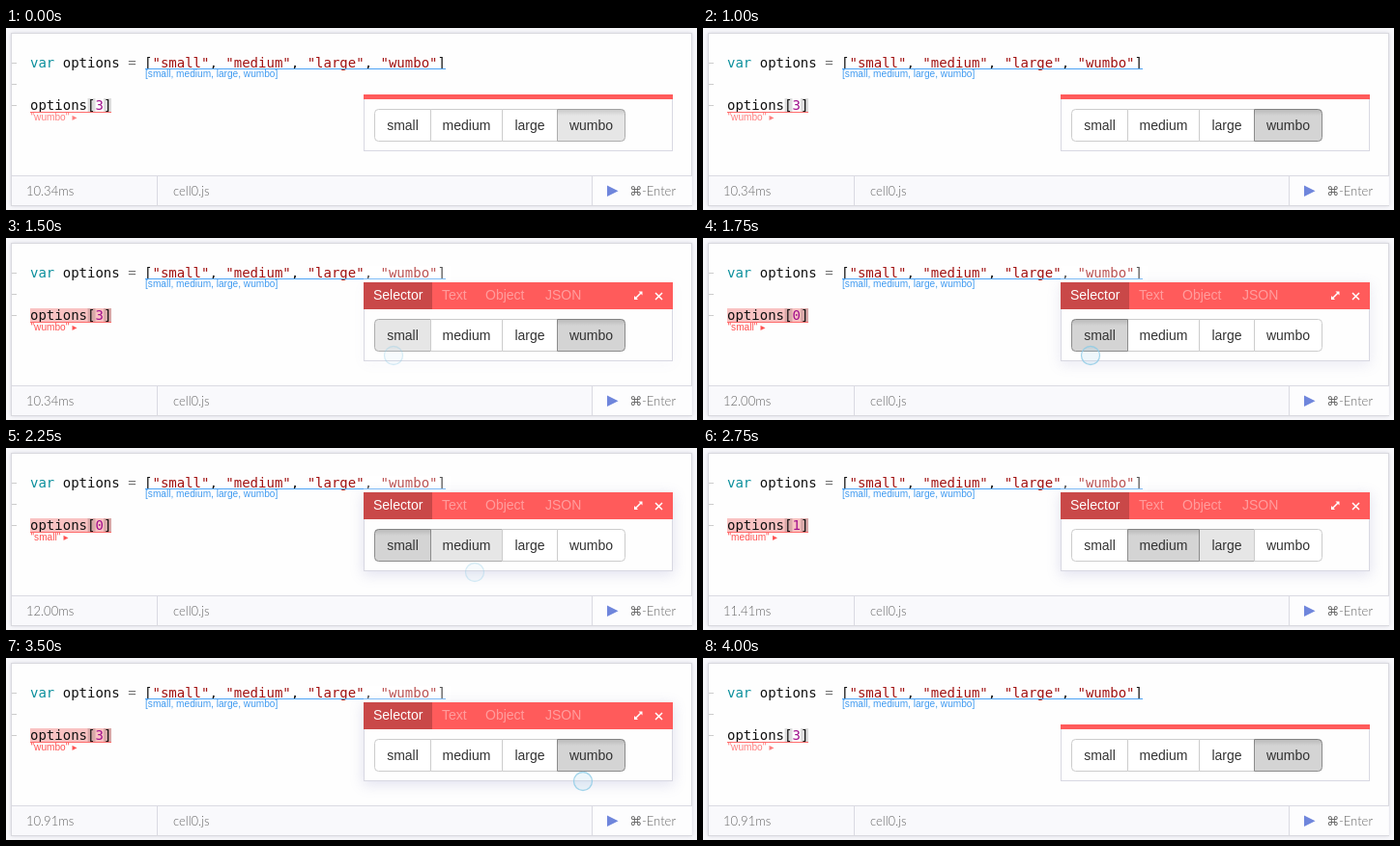
Animation, 715 px wide and 189 px high, one loop 5 s. Source, as an HTML page:

```html
<!DOCTYPE html>
<html lang="en">
<head>
<meta charset="utf-8">
<title>Selector widget</title>
<style>
  html, body { margin: 0; width: 100%; height: 100%; overflow: hidden; background: #f8f8fb; }
  svg { display: block; width: 715px; height: 189px; }
  text { white-space: pre; }
  .code { font: 14px "DejaVu Sans Mono", monospace; fill: #111; }
  .key { fill: #0a8f9c; }
  .op { fill: #777; }
  .str { fill: #a11111; }
  .num { fill: #a0108c; }
  .note { font: 10.15px "Liberation Sans", Arial, sans-serif; }
  .arrow { font: 10px "DejaVu Sans", sans-serif; }
  .foot { font: 300 13px Lato, sans-serif; fill: #666; }
  .foot .cmd { font: 13px "DejaVu Sans", sans-serif; }
  .ui { font: 14px "Liberation Sans", Arial, sans-serif; }
  .card { fill: #fefefe; stroke: #d9d9df; filter: drop-shadow(0 0 2px rgba(90, 90, 120, .2)); }
  .line { fill: none; stroke: #dadae2; }
  .shade { fill: #7878b8; filter: blur(7px); }
  .btn path { fill: #fff; stroke: #ccc; }
  .btn text { fill: #333; text-anchor: middle; }
  .btn .inset { fill: none; stroke: none; }
  .btn.hover path { fill: #e6e6e6; stroke: #adadad; }
  .btn.on path { fill: #d4d4d4; stroke: #8c8c8c; }
  .btn.soft path { fill: #e6e6e6; stroke: #adadad; }
  .btn.on .inset, .btn.soft .inset { fill: url(#inset); stroke: none; }
  .btn.hover .inset { fill: none; stroke: none; }
  .tabs { fill: #fff; }
  .dim { opacity: .4; }
  .icon { fill: none; stroke: #fff; stroke-width: 1.5; }
</style>
</head>
<body>
<svg viewBox="0 0 715 189">
  <defs>
    <linearGradient id="inset" x2="0" y2="1">
      <stop offset="0" stop-color="#000" stop-opacity=".13"/>
      <stop offset=".2" stop-color="#000" stop-opacity="0"/>
    </linearGradient>
    <clipPath id="headClip"><rect id="clip" x="370" width="320"/></clipPath>
  </defs>

  <rect class="card" x="5.5" y="5.5" width="704" height="179"/>
  <rect x="6" y="154" width="704" height="30" fill="#f9f9fc"/>
  <path class="line" d="M6 153.5H710M156.5 154V184M606.5 154V184"/>
  <rect x="607" y="154" width="102" height="30" fill="#fdfdfe"/>
  <path d="M6 36.5h5M6 58.5h5M6 80.5h5" stroke="#ccc"/>

  <text class="code" x="25" y="41"><tspan class="key">var</tspan> options <tspan class="op">=</tspan> [<tspan class="str">"small"</tspan>, <tspan class="str">"medium"</tspan>, <tspan class="str">"large"</tspan>, <tspan class="str">"wumbo"</tspan>]</text>
  <path d="M144 42.5H455" stroke="#4da3f5"/>
  <text class="note" x="144" y="51" fill="#3f9af0">[small, medium, large, wumbo]</text>

  <rect id="mark" x="25" y="73" width="84" height="14" fill="#f9c2c2"/>
  <path d="M84.5 73h8v14h-8zM101 73h8v14h-8z" fill="#000" opacity=".13"/>
  <text class="code" x="25" y="85">options[<tspan class="num" id="index"></tspan>]</text>
  <path d="M25 87.5H109" stroke="#ff6b6b"/>
  <text class="note" id="note" x="25.5" y="95.5"><tspan id="value"></tspan><tspan class="arrow"> ▸</tspan></text>

  <text class="foot" id="time" x="21" y="174"></text>
  <text class="foot" x="173" y="174">cell0.js</text>
  <path d="M622 163.5L633.5 169.3L622 175z" fill="#6f86dc"/>
  <text class="foot" x="645" y="174"><tspan class="cmd">⌘</tspan>-Enter</text>

  <rect id="shade" class="shade" x="369" y="48" width="322" height="84"/>
  <rect id="veil" x="370" y="29" width="90" height="17" fill="#fff"/>
  <rect x="370.5" y="73.5" width="319" height="54" fill="#fefefe" stroke="#d8d8e2"/>

  <g clip-path="url(#headClip)">
    <rect x="370" y="46" width="320" height="28" fill="#ff5b5b"/>
    <g id="tabs" class="ui tabs">
      <rect x="370" y="46" width="71" height="28" fill="#c94848"/>
      <text x="380" y="64">Selector</text>
      <g class="dim">
        <text x="451" y="64">Text</text>
        <text x="496" y="64">Object</text>
        <text x="558" y="64">JSON</text>
      </g>
      <path class="icon" d="M651 63L657.5 56.5M672 57L679 64M679 57L672 64"/>
      <path d="M654.5 55.5H658.5V59.5zM650 60V64H654z"/>
    </g>
  </g>

  <g id="buttons" class="ui"></g>
  <circle id="tap" r="9.5" fill="#9fd8ee" fill-opacity=".2" stroke="#8ccbe6" stroke-width="1.3"/>
</svg>
<script>
  const $ = id => document.getElementById(id);
  const options = ["small", "medium", "large", "wumbo"];
  const edges = [381.5, 439.5, 513.5, 570.5, 640.5];

  const shapes = options.map((name, i) => {
    const l = edges[i], r = edges[i + 1];
    const a = i === 0 ? 4 : 0, b = i === 3 ? 4 : 0;
    return `M${l + a} 84.5H${r - b}q${b} 0 ${b} ${b}V${117.5 - b}q0 ${b} ${-b} ${b}` +
      `H${l + a}q${-a} 0 ${-a} ${-a}V${84.5 + a}q0 ${-a} ${a} ${-a}z`;
  });
  $("buttons").innerHTML = options.map((name, i) =>
    `<g class="btn"><path d="${shapes[i]}"/><path class="inset" d="${shapes[i]}"/>` +
    `<text x="${(edges[i] + edges[i + 1]) / 2}" y="106">${name}</text></g>`).join("");
  const buttons = [...$("buttons").children];

  // Each step overrides only what changes at its time.
  const steps = [
    { at: 0, pick: 3, hover: -1, soft: true, ms: "10.34", mark: 0, open: 0, shade: 0, tap: null },
    { at: 1000, soft: false },
    { at: 1250, mark: .5 },
    { at: 1500, mark: 1, open: 1, shade: .15, hover: 0, tap: [401, 122, .35] },
    { at: 1750, pick: 0, ms: "12.00", shade: .7, tap: [401, 122, .8] },
    { at: 2000, hover: 1, shade: 1, tap: null },
    { at: 2250, tap: [485, 129, .35] },
    { at: 2500, pick: 1, ms: "11.41", tap: [485, 129, .8] },
    { at: 2750, hover: 2, tap: null },
    { at: 3000, pick: 2, ms: "11.83", tap: [535, 124, .85] },
    { at: 3250, hover: 3, tap: [597, 128, .4] },
    { at: 3500, pick: 3, ms: "10.91", tap: [597, 128, .8] },
    { at: 3750, hover: -1, mark: .5, open: .5, shade: .45, tap: null },
    { at: 4000, mark: 0, open: 0, shade: 0 }
  ];

  function draw(s) {
    buttons.forEach((b, i) => {
      const state = i === s.pick ? (s.soft ? "soft" : "on") : i === s.hover ? "hover" : "";
      b.setAttribute("class", "btn " + state);
    });
    // Selected borders must sit above their neighbours.
    $("buttons").append(...buttons.filter((b, i) => i !== s.pick), buttons[s.pick]);

    $("index").textContent = s.pick;
    $("value").textContent = `"${options[s.pick]}"`;
    $("time").textContent = s.ms + "ms";
    $("mark").style.opacity = s.mark;
    $("note").setAttribute("fill", s.mark ? "#ff5252" : "#ff7f7f");

    const h = 5 + 23 * s.open;
    $("clip").setAttribute("y", 74 - h);
    $("clip").setAttribute("height", h);
    $("tabs").style.opacity = s.open;
    $("veil").style.opacity = .28 * s.open;
    $("shade").style.opacity = .2 * s.shade;

    const [x, y, alpha] = s.tap || [0, 0, 0];
    $("tap").setAttribute("cx", x);
    $("tap").setAttribute("cy", y);
    $("tap").style.opacity = alpha;
  }

  let shown = -1;
  function tick() {
    const t = performance.now() % 5000;
    const n = steps.filter(s => s.at <= t).length;
    if (n !== shown) draw(Object.assign({}, ...steps.slice(0, n)));
    shown = n;
    requestAnimationFrame(tick);
  }
  tick();
</script>
</body>
</html>
```
